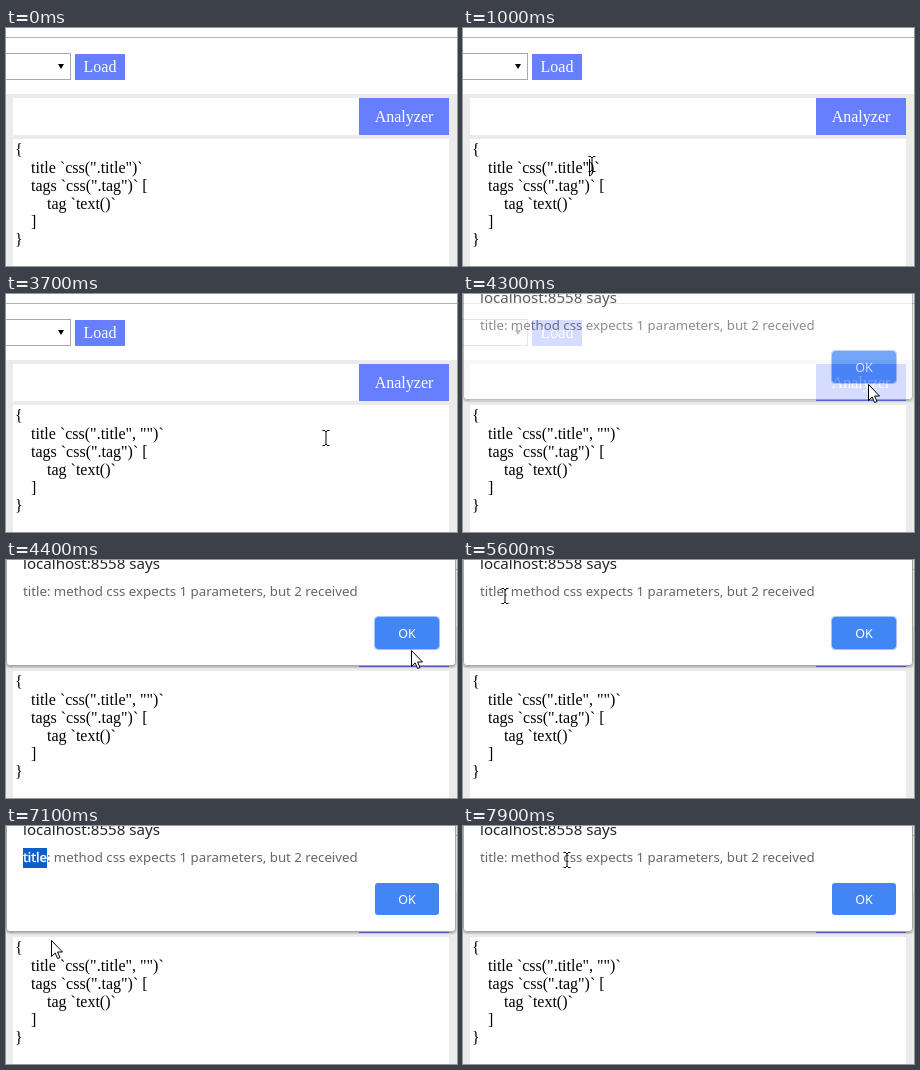
Recreate the animation shown at these times as an HTML page. Size 451 by 238 pixels, loop 8000 ms.

```html
<!DOCTYPE html>
<html lang="en">
<head>
<meta charset="utf-8">
<title>Selector analyzer</title>
<style>
  html, body { margin: 0; width: 100%; height: 100%; overflow: hidden; background: #fff; }
  svg { display: block; width: 451px; height: 238px; }
  text { white-space: pre; }
  .serif { font: 16px "Liberation Serif", serif; }
  .sans { font: 13.25px "Noto Sans", sans-serif; }
  .box { shape-rendering: crispEdges; }
</style>
</head>
<body>
<svg viewBox="0 0 451 238">
  <defs>
    <clipPath id="selClip"><rect id="clipBox" y="22" height="20"/></clipPath>
    <filter id="shade" x="-10%" y="-20%" width="120%" height="150%">
      <feDropShadow dx="0" dy="1" stdDeviation="1.2" flood-color="#000" flood-opacity=".4"/>
    </filter>
  </defs>

  <g class="box">
    <rect width="451" height="238" fill="#fff"/>
    <rect y="9" width="451" height="1" fill="#b3b3b3"/>
    <rect x="-5.5" y="25.5" width="70" height="26" fill="#fff" stroke="#a9a9a9"/>
    <rect x="69" y="26" width="50" height="26" fill="#667fff"/>
    <rect y="66" width="451" height="172" fill="#ebebeb"/>
    <rect x="7" y="70" width="346" height="37" fill="#fff"/>
    <rect x="353" y="70" width="90" height="37" fill="#667fff"/>
    <rect x="7" y="111" width="436" height="127" fill="#fff"/>
  </g>
  <path d="M52 36h6l-3 5z"/>
  <g class="serif" fill="#fff" text-anchor="middle">
    <text x="94" y="44">Load</text>
    <text x="398" y="94">Analyzer</text>
  </g>
  <g class="serif">
    <text x="9" y="127">{</text>
    <text id="rule" x="25" y="145"></text>
    <text x="25" y="163">tags `css(".tag")` [</text>
    <text x="41" y="181">tag `text()`</text>
    <text x="25" y="199">]</text>
    <text x="9" y="217">}</text>
  </g>
  <rect id="caret" class="box" y="131" width="1" height="17"/>

  <g id="dialog">
    <path d="M.5 -5V102.500q0 3 3 3H446.500q3 0 3 -3V-5z" fill="#fefefe" stroke="#a6a6a6" filter="url(#shade)"/>
    <text x="17" y="9" class="sans" style="font-size:15.1px" fill="#222">localhost:8558 says</text>
    <text x="17" y="36" class="sans" fill="#666">title: method css expects 1 parameters, but 2 received</text>
    <g clip-path="url(#selClip)">
      <rect x="17" y="22" width="24" height="20" fill="#0a5fcb"/>
      <text x="17" y="36" class="sans" fill="#fff" stroke="#fff" stroke-width=".4">title</text>
    </g>
    <rect x="369" y="57" width="64" height="32" rx="3" fill="#4285f4"/>
    <rect id="ring" x="368.500" y="56.500" width="65" height="33" rx="3.500" fill="none" stroke="#a3c4fa"/>
    <text x="401" y="78" class="sans" style="font-size:12.5px" fill="#fff" text-anchor="middle">OK</text>
  </g>

  <path id="beam" d="M-3.500 -7.500H-1M1 -7.500H3.500M-1 -6.500H1M0 -6V6M-1 6.500H1M-3.500 7.500H-1M1 7.500H3.500" fill="none" stroke="#000"/>
  <path id="arrow" d="M.5 .5V16.500L4.200 13L6.600 18.500L9 17.500L6.600 12H11.500z" fill="#fff" stroke="#000"/>
</svg>
<script>
const LOOP = 8000, STEP = 100;
const ENTER = 100, CLICK = 1000, ALERT = 4200, SELECT = 5800, DRAGGED = 6100, CLEAR = 7900;
const CODE = 'title `css(".title"';
const el = id => document.getElementById(id);
const show = (node, on) => node.setAttribute('visibility', on ? 'visible' : 'hidden');
const clamp = (v, lo, hi) => Math.min(hi, Math.max(lo, v));

// Pointer moves: start, end, target x, target y
const moves = [
  [ENTER, 500, 129, 136],
  [3200, 3400, 97, 190], [3400, 3700, 320, 144], [3700, 4000, 405, 90],
  [4600, 5200, 104, 50], [5200, 5600, 42, 36],
  [SELECT, DRAGGED, 12, 35], [DRAGGED, 6400, 27, 50], [6400, 6600, 28, 138],
  [6600, 6800, 37, 145], [6900, 7300, 52, 83], [7300, 7800, 104, 34]
];
const keys = [[2000, ','], [2120, ' '], [2700, '"'], [2800, '"']];

function pointer(t) {
  let x = 255, y = 112;
  for (const [from, to, tx, ty] of moves) {
    const k = clamp((t - from) / (to - from), 0, 1);
    x += (tx - x) * k;
    y += (ty - y) * k;
  }
  return [Math.round(x), Math.round(y)];
}

function drawEditor(t) {
  const done = keys.filter(k => t >= k[0]);
  const code = CODE + done.map(k => k[1]).join('');
  const rule = el('rule');
  rule.textContent = code + ')`';
  el('caret').setAttribute('x', 25 + Math.round(rule.getSubStringLength(0, code.length)));

  // The caret restarts its blink at each click or key
  const last = done.length ? done[done.length - 1][0] : CLICK;
  show(el('caret'), t >= CLICK && t < ALERT && (t - last) % 1000 < 480);
}

function drawDialog(t, x) {
  show(el('dialog'), t >= ALERT);
  el('dialog').setAttribute('opacity', clamp(0.4 + (t - ALERT) / 300, 0, 1));
  show(el('ring'), t >= ALERT && t < SELECT);

  const left = t < DRAGGED ? clamp(x, 17, 41) : 17;
  el('clipBox').setAttribute('x', left);
  el('clipBox').setAttribute('width', t >= SELECT && t < CLEAR ? 41 - left : 0);
}

function draw(time) {
  const t = Math.floor(time % LOOP / STEP) * STEP;
  const [x, y] = pointer(t);
  drawEditor(t);
  drawDialog(t, x);

  const overText = t >= ALERT ? y < 44 : y > 110;
  for (const id of ['beam', 'arrow']) {
    el(id).setAttribute('transform', `translate(${x} ${y})`);
    show(el(id), t >= ENTER && (id === 'beam') === overText);
  }
}

const start = performance.now();
function tick(now) {
  draw(Math.max(0, now - start));
  requestAnimationFrame(tick);
}
draw(0);
requestAnimationFrame(tick);
</script>
</body>
</html>
```
